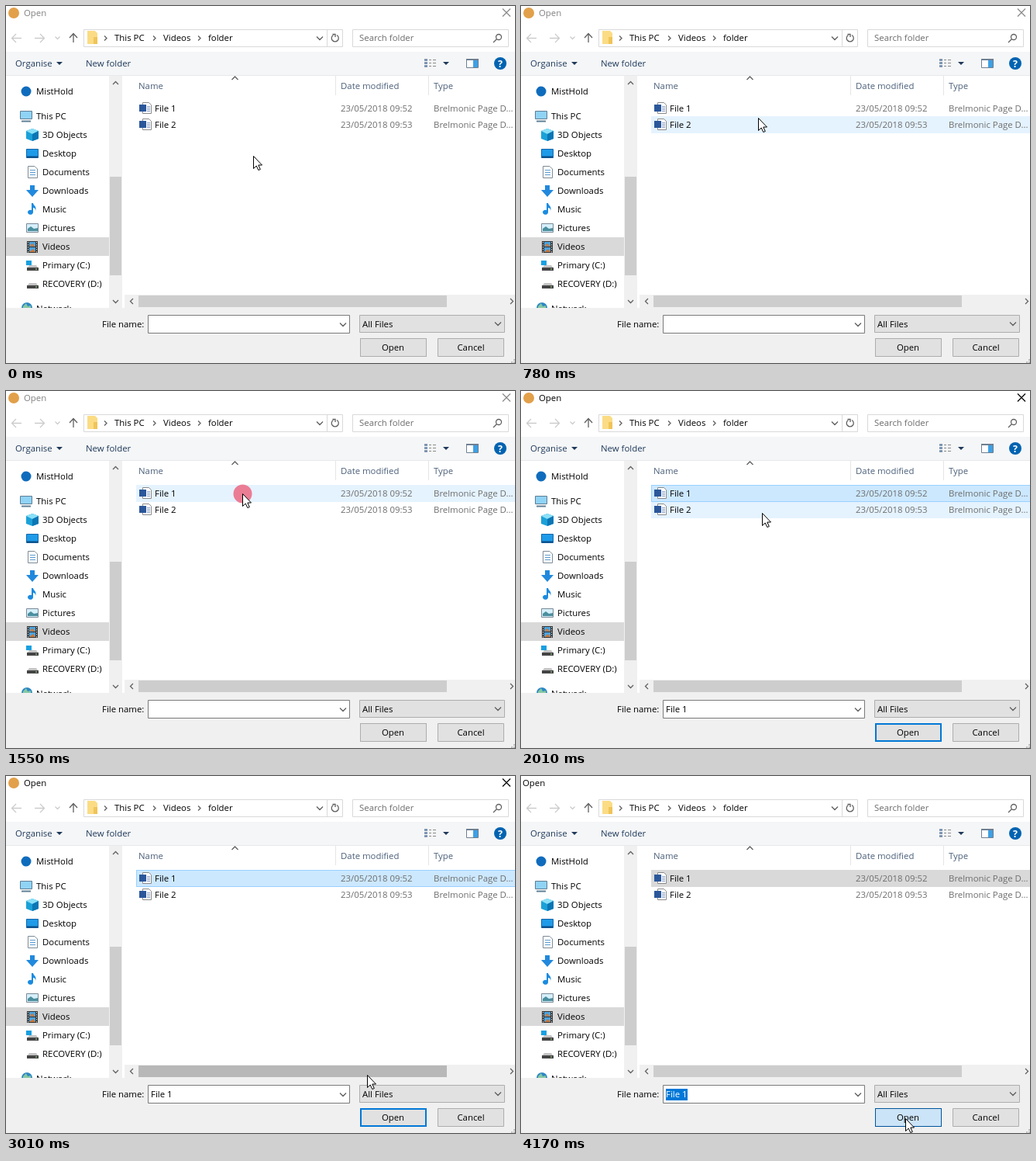
These frames come from a looping animation (657 px wide and 460 px high, 4.24 s). An HTML page:

```html
<!DOCTYPE html>
<html lang="en">
<head>
<meta charset="utf-8">
<title>Open dialog</title>
<style>
  html, body { margin: 0; width: 100%; height: 100%; overflow: hidden; background: #fff; }
  svg { display: block; font: 11.4px "Open Sans", "Noto Sans", sans-serif; }
  .line { fill: none; stroke: #606060; stroke-width: 1.3; }
  .pale { stroke: #ccc; }
  .grey { fill: #6d6d6d; }
  .head { fill: #4c607a; }
  .tool { fill: #1e395b; }
  .mid { text-anchor: middle; }
  .box { fill: #fff; stroke: #d9d9d9; }
  .btn { fill: #e1e1e1; stroke: #adadad; }
</style>
</head>
<body>
<svg width="657" height="460" viewBox="0 0 657 460">
  <defs>
    <clipPath id="sideClip"><path d="M0 90H133V389H0Z"/></clipPath>
    <g id="doc">
      <path d="M4.500 .5H12.500L15.500 3.500V14.500H4.500Z" fill="#fff" stroke="#8a8a8a"/>
      <path d="M10 5.500H14M10 7.500H14M10 9.500H14M10 11.500H14" stroke="#8ba3c9"/>
      <path d="M0 3H9V12H0Z" fill="#2b579a"/>
    </g>
    <g id="drive">
      <path d="M3 0H12L15 4H0Z" fill="#c4c4c4"/>
      <path d="M0 3H15V7H0Z" fill="#444"/>
      <path d="M11 5H13" stroke="#9fe08a"/>
    </g>
  </defs>

  <!-- title bar -->
  <g id="frame">
    <circle cx="10" cy="9" r="7" fill="#e2a04a"/>
    <path id="close" d="M641 3.500L651 13.500M651 3.500L641 13.500" fill="none" stroke-width="1.200"/>
  </g>
  <text id="title" y="13">Open</text>

  <!-- navigation -->
  <path class="line pale" d="M20 41.500H8M13 36L7.500 41.500L13 47M37 41.500H49M44 36L49.500 41.500L44 47M63.500 39.500L66.500 42.500L69.500 39.500"/>
  <path class="line" stroke-width="1.600" d="M87 47V36M82 41L87 35.500L92 41"/>
  <path class="box" d="M100.500 30.500H434.500V52.500H100.500ZM414.500 31V52M447.500 30.500H648.500V52.500H447.500Z"/>
  <path d="M105 32H115L118 35V49H105Z" fill="#fbdc84"/>
  <path d="M113 40H118V49H113Z" fill="#efc458"/>
  <path class="line" d="M127 38.500L130 41.500L127 44.500M190 38.500L193 41.500L190 44.500M248 38.500L251 41.500L248 44.500M401 39.500L405 43.500L409 39.500"/>
  <path class="line" d="M427 37.500A4.500 4.500 0 1 1 422.500 37.500M421.500 36.500H425V40"/>
  <path class="line" d="M633.500 42.500L629 47"/>
  <circle class="line" cx="636" cy="40" r="3.500"/>
  <text x="140" y="45">This PC</text>
  <text x="203" y="45">Videos</text>
  <text x="261" y="45">folder</text>
  <text class="grey" x="456" y="45">Search folder</text>

  <!-- toolbar -->
  <path d="M0 59H657V90H0Z" fill="#f5f6f7"/>
  <path d="M0 89.500H657" stroke="#e8e9ea"/>
  <text class="tool" x="12" y="78">Organise</text>
  <text class="tool" x="103" y="78">New folder</text>
  <path class="tool" d="M65 72H73L69 76ZM564 72H572L568 76Z"/>
  <path d="M540 69.500H544M540 73.500H544M540 77.500H544" stroke="#6b87a8" stroke-width="2.500"/>
  <path d="M546 69.500H549M551 69.500H555M546 73.500H549M551 73.500H555M546 77.500H549M551 77.500H555" stroke="#8a8a8a"/>
  <path d="M594.500 68.500H609.500V79.500H594.500Z" fill="#fff" stroke="#6e7f92"/>
  <path d="M594 68H610V70H594Z" fill="#6e7f92"/>
  <path d="M603 70H609V79H603Z" fill="#3ea0e4"/>
  <circle cx="638" cy="74" r="8" fill="#0063b1"/>
  <text class="mid" x="638" y="78.500" fill="#fff" font-size="12.500" font-weight="700">?</text>

  <!-- sidebar -->
  <path d="M0 298H133V322H0Z" fill="#d9d9d9"/>
  <g id="side" clip-path="url(#sideClip)">
    <circle cx="26" cy="110" r="6.500" fill="#0f6cbd"/>
    <path d="M18.500 135.500H33.500V145.500H18.500Z" fill="#8fd3f5" stroke="#5f7f95"/>
    <path d="M20 148.500H32" stroke="#5f7f95" stroke-width="2"/>
    <path d="M26 161L34 158L42 161V171L34 174L26 171Z" fill="#1ba1d8"/>
    <path d="M26 161L34 158L42 161L34 165Z" fill="#8be0f7"/>
    <path d="M34 165L42 161V171L34 174Z" fill="#0b76b5"/>
    <path d="M26.500 184.500H41.500V195.500H26.500Z" fill="#1e9be8" stroke="#1468ad"/>
    <path d="M27 194.500H41" stroke="#0b4c85" stroke-width="2"/>
    <path d="M28.500 206.500H37L40.500 210V221.500H28.500Z" fill="#fff" stroke="#7c8a96"/>
    <path d="M31 211.500H38M31 214.500H38M31 217.500H38" stroke="#5b9bd0"/>
    <path d="M31 231H37V237H42L34 246L26 237H31Z" fill="#2189dd"/>
    <path d="M33 254H35C36 258 40 258 38 264C38 261 37 260 35 260V266A3.500 3 0 1 1 33 263Z" fill="#1b8be0"/>
    <path d="M26.500 280.500H41.500V291.500H26.500Z" fill="#d5effb" stroke="#7c8a96"/>
    <path d="M28 290V287L32 284L36 287L41 286V290Z" fill="#4b8f9e"/>
    <path d="M27 303H41V318H27Z" fill="#333"/>
    <path d="M30 304H38V310H30ZM30 311H38V317H30Z" fill="#4ca3df"/>
    <path d="M30 309L34 306L38 310ZM30 317L35 313L38 317Z" fill="#c9783b"/>
    <path d="M28.500 304V318M39.500 304V318" stroke="#ddd" stroke-dasharray="1.500 1.500"/>
    <path d="M26 328H33V334H26Z" fill="#17a0e0"/>
    <use href="#drive" x="27" y="334"/>
    <use href="#drive" x="27" y="357"/>
    <circle cx="27" cy="389" r="7" fill="#2c86c4"/>
    <path d="M22 387L26 383L28 387L32 386V389H22Z" fill="#85c8a2"/>
  </g>
  <path d="M133 90H150V389H133Z" fill="#f0f0f0"/>
  <path d="M134 220H149V347H134Z" fill="#cdcdcd"/>
  <path class="line" stroke-width="1.700" d="M138 101L141.500 97.500L145 101M138 379L141.500 382.500L145 379"/>

  <!-- file list -->
  <path d="M425.500 90V115M545.500 90V115" stroke="#e5e5e5"/>
  <path class="line" d="M291.500 95L295.500 91L299.500 95"/>
  <text class="head" x="171" y="107">Name</text>
  <text class="head" x="432" y="107">Date modified</text>
  <text class="head" x="552" y="107">Type</text>
  <rect id="row2" x="168" y="142" width="500" height="22" fill="#e5f3ff"/>
  <rect id="row1" x="168.500" y="121.500" width="500" height="21"/>
  <g id="files"></g>
  <path d="M153 372H657V389H153Z" fill="#f0f0f0"/>
  <path id="thumb" d="M171 373H569V388H171Z"/>
  <path class="line" stroke-width="1.700" d="M164 377L160.500 380.500L164 384M651 377L654.500 380.500L651 384"/>

  <!-- bottom panel -->
  <path d="M0 389H657V460H0Z" fill="#f0f0f0"/>
  <text x="124" y="414">File name:</text>
  <path d="M183.500 398.500H443.500V421.500H183.500Z" fill="#fff" stroke="#7a7a7a"/>
  <path id="mark" d="M187 403H215V418H187Z" fill="#0078d7"/>
  <text id="name" x="187" y="414">File 1</text>
  <path class="btn" id="filter" d="M456.500 398.500H643.500V420.500H456.500Z"/>
  <text x="460" y="414">All Files</text>
  <path class="line" d="M431 408.500L435 412.500L439 408.500M631 407.500L635 411.500L639 407.500"/>
  <rect id="open"/>
  <text class="mid" x="499.500" y="444">Open</text>
  <path class="btn" d="M557.500 428.500H642.500V451.500H557.500Z"/>
  <text class="mid" x="600" y="444">Cancel</text>
  <path d="M655 455H657V457H655ZM652 458H654V460H652ZM655 458H657V460H655Z" fill="#bfbfbf"/>

  <!-- pointer -->
  <g id="pointer">
    <circle id="press" cx=".5" cy=".5" r="12" fill="#ee3352" fill-opacity=".62"/>
    <path d="M.5 .5V16.500L4.200 13L6.800 18.500L9.300 17.500L6.800 12H11.500Z" fill="#fff" stroke="#000"/>
  </g>
</svg>
<script>
const $ = id => document.getElementById(id);
const set = (id, attrs) => {
  for (const key in attrs) $(id).setAttribute(key, attrs[key]);
};
const show = (id, on) => set(id, { visibility: on ? "visible" : "hidden" });

const places = ["MistHold", "This PC", "3D Objects", "Desktop", "Documents", "Downloads",
  "Music", "Pictures", "Videos", "Primary (C:)", "RECOVERY (D:)", "Network"];
$("side").innerHTML += places.map((label, i) => {
  const y = i == 0 ? 114 : i == 11 ? 394 : 122 + 24 * i;
  return `<text x="${i > 1 && i < 11 ? 47 : 39}" y="${y}">${label}</text>`;
}).join("");

$("files").innerHTML = [1, 2].map(n => {
  const y = 115 + 21 * n;
  return `<use href="#doc" x="172" y="${y - 12}"/><text x="192" y="${y}">File ${n}</text>
    <text class="grey" x="432" y="${y}">23/05/2018 09:5${n + 1}</text>
    <text class="grey" x="552" y="${y}">Brelmonic Page D...</text>`;
}).join("");

// Pointer path to the button: step, x, y
const path = [[0, 305, 132], [4, 311, 157], [7, 384, 240], [14, 440, 334], [17, 466, 385],
  [21, 488, 430], [24, 495, 441], [26, 496, 441]];

const slope = (i, axis) => (path[i + 1][axis] - path[i][axis]) / (path[i + 1][0] - path[i][0]);

function tangent(i, axis) {
  if (i == 0 || i == path.length - 1) return 0;
  const a = slope(i - 1, axis), b = slope(i, axis);
  return a * b > 0 ? 2 * a * b / (a + b) : 0;
}

// Monotone cubic interpolation
function along(step, axis) {
  let i = 0;
  while (i < path.length - 2 && step > path[i + 1][0]) i++;
  const [p, q] = [path[i], path[i + 1]], h = q[0] - p[0], u = (step - p[0]) / h, v = 1 - u;
  return p[axis] * v * v * (1 + 2 * u) + q[axis] * u * u * (3 - 2 * u)
    + h * u * v * (v * tangent(i, axis) - u * tangent(i + 1, axis));
}

function pointerAt(tick) {
  if (tick > 17) {
    const step = Math.min(26, tick - 17);
    return [along(step, 1), along(step, 2)].map(Math.round);
  }
  const ease = Math.sin(Math.min(1, (tick + 1) / 10) * Math.PI / 2);
  return [Math.round(319 - 14 * Math.sqrt(ease)), Math.ceil(193 - 61 * ease)];
}

function draw(time) {
  const tick = Math.max(-1, Math.floor((time - 396) / 76.8));
  const [x, y] = pointerAt(tick);
  const chosen = tick >= 16, done = tick >= 49;

  set("pointer", { transform: `translate(${x} ${y})` });
  show("press", tick == 15 || tick == 48);

  show("frame", !done);
  set("title", { x: done ? 2 : 23, fill: chosen ? "#000" : "#808080" });
  set("close", { stroke: chosen ? "#000" : "#8a8a8a" });

  show("row1", chosen || y < 142);
  const rowFill = done ? "#d9d9d9" : chosen ? "#cce8ff" : "#e5f3ff";
  set("row1", { fill: rowFill, stroke: chosen && !done ? "#99d1ff" : rowFill });
  show("row2", y >= 142 && y < 163);

  set("thumb", { fill: y >= 373 && y < 389 ? "#b8b8b8" : "#cdcdcd" });
  show("name", chosen);
  set("name", { fill: done ? "#fff" : "#000" });
  show("mark", done);

  const hot = tick < 35 || tick > 44 ? 0 : tick < 42 ? 1 : 2;
  $("filter").style.fill = ["#e1e1e1", "#d7e3ed", "#dce2e7"][hot];
  $("filter").style.stroke = ["#adadad", "#6f9dc0", "#8ea5b7"][hot];

  const over = y >= 428, thick = chosen && !over;
  const inset = thick ? 1 : .5;
  set("open", {
    x: 457 + inset, y: 428 + inset, width: 86 - 2 * inset, height: 24 - 2 * inset,
    fill: done ? "#cce4f7" : over ? "#e5f1fb" : "#e1e1e1",
    stroke: done ? "#005499" : chosen ? "#0078d7" : "#adadad",
    "stroke-width": 2 * inset
  });
}

function loop() {
  draw(performance.now() % 4240);
  requestAnimationFrame(loop);
}
loop();
</script>
</body>
</html>
```
